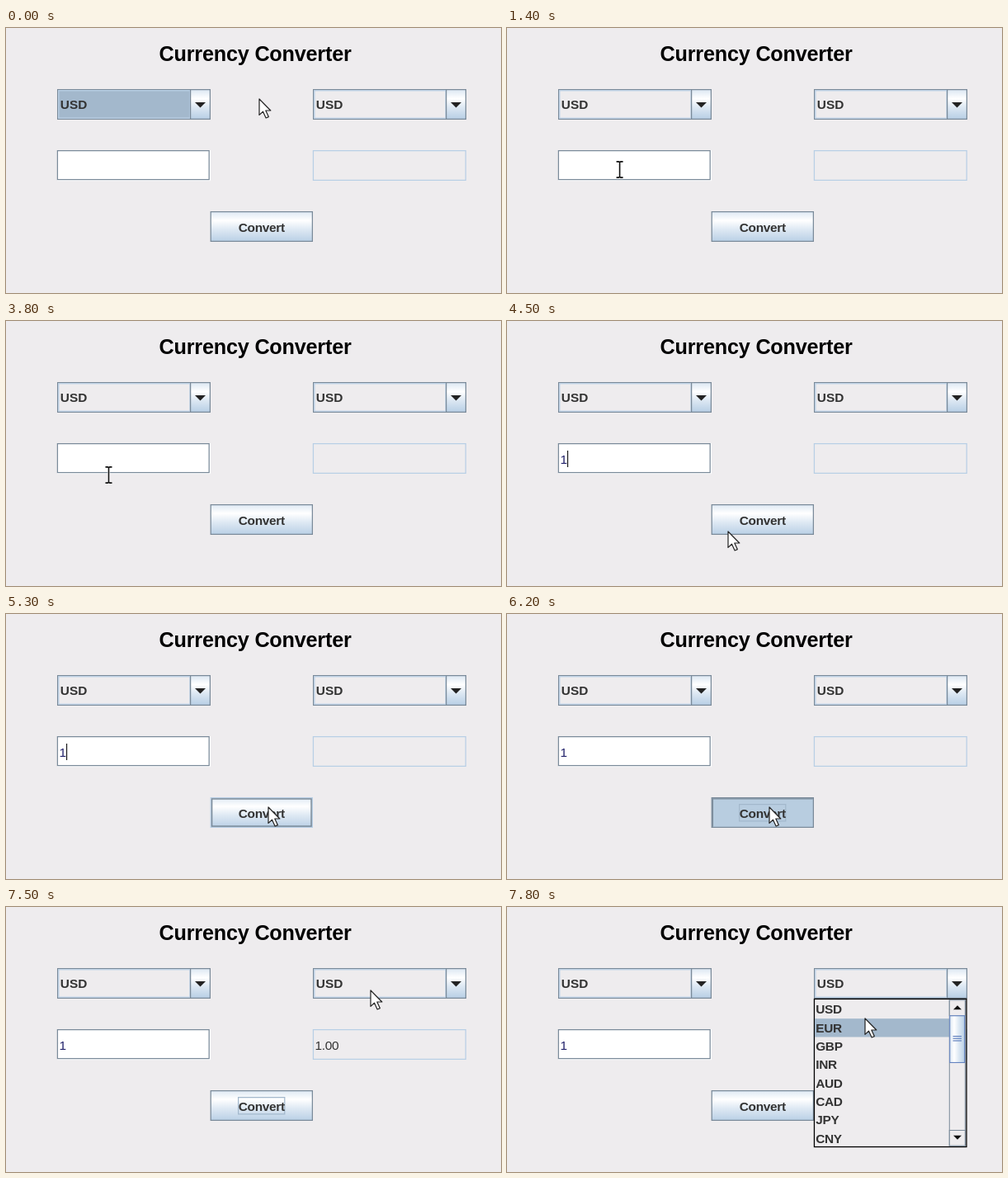
Recreate the animation shown at these times as an HTML page. Size 600x321 px, loop 8000 ms.

```html
<!DOCTYPE html>
<html lang="en">
<head>
<meta charset="utf-8">
<title>Currency Converter</title>
<style>
  html, body { margin: 0; width: 100%; height: 100%; overflow: hidden; background: #eeecee; }
  svg { display: block; width: 100vw; height: 100vh; }
  text { font: bold 15.4px "Liberation Sans", Arial, sans-serif; letter-spacing: -.3px; fill: #333; white-space: pre; }
  .title { font-size: 25.2px; letter-spacing: -.2px; fill: #000; }
  .value { font-weight: normal; }
</style>
</head>
<body>
<svg id="stage" viewBox="0 0 600 321" xmlns="http://www.w3.org/2000/svg">
  <defs>
    <linearGradient id="ocean" x1="0" y1="0" x2="0" y2="1">
      <stop offset="0" stop-color="#dde8f3"/>
      <stop offset=".3" stop-color="#fff"/>
      <stop offset=".6" stop-color="#dde8f3"/>
      <stop offset="1" stop-color="#b8cfe5"/>
    </linearGradient>
    <linearGradient id="oceanSide">
      <stop offset="0" stop-color="#dde8f3"/>
      <stop offset=".3" stop-color="#fff"/>
      <stop offset=".6" stop-color="#dde8f3"/>
      <stop offset="1" stop-color="#b8cfe5"/>
    </linearGradient>
  </defs>
</svg>
<script>
const stage = document.getElementById("stage");
const LOOP = 8000;
const EDGE = "#7a8a99", PALE = "#b8cfe5", PICK = "#a3b8cc", PRESS = "#b8cde0", PANEL = "#eeecee";

function add(tag, attrs, parent = stage) {
  const el = document.createElementNS("http://www.w3.org/2000/svg", tag);
  for (const key in attrs) el.setAttribute(key, attrs[key]);
  parent.appendChild(el);
  return el;
}
const group = parent => add("g", {}, parent);
const fillBox = (x, y, width, height, fill, parent) =>
  add("rect", { x, y, width, height, fill }, parent);
// The outline lies inside the given box.
const frameBox = (x, y, w, h, stroke, parent, line = 1.24, fill = "none") =>
  add("rect", { x: x + line / 2, y: y + line / 2, width: w - line, height: h - line,
    fill, stroke, "stroke-width": line }, parent);
const path = (d, attrs, parent) => add("path", { d, ...attrs }, parent);
function label(x, y, content, parent, cls = "") {
  const el = add("text", { x, y, class: cls }, parent);
  el.textContent = content;
  return el;
}
const show = (el, on) => el.setAttribute("visibility", on ? "visible" : "hidden");

function combo(x) {
  const y = 74;
  frameBox(x, y, 186, 37, EDGE, stage, 1.24, PANEL);
  const focus = fillBox(x + 1.3, y + 1.3, 160, 34.4, PICK);
  frameBox(x + 1.2, y + 1.2, 160.4, 34.6, PALE);
  fillBox(x + 161, y + 1, 24, 35, "url(#ocean)");
  frameBox(x + 161, y, 25, 37, EDGE);
  path(`M${x + 167} ${y + 16}h13l-6.5 6.6z`, { fill: "#222" });
  label(x + 3.8, y + 23.6, "USD").style.letterSpacing = "0";
  return focus;
}

label(185.6, 39.6, "Currency Converter", stage, "title");
const leftFocus = combo(62);
const rightFocus = combo(372);
show(rightFocus, false);

// Input and result fields
fillBox(62, 148, 186, 37.2, "#fff");
frameBox(61.8, 148, 185, 36.2, EDGE);
const amount = label(64.4, 172.6, "1", stage, "value");
amount.style.fill = "#22226a";
const caret = fillBox(64.4, 157, 1.3, 20, "#222");
frameBox(371.8, 148, 186, 37, PALE);
const result = label(374.4, 172.6, "1.00", stage, "value");

// Convert button
const face = fillBox(248, 222, 124, 37, "url(#ocean)");
const edge = frameBox(247.6, 222, 124.4, 37, EDGE);
const hover = group();
frameBox(247.6, 222, 124.4, 37, PALE, hover);
frameBox(248.8, 223.2, 122, 34.6, EDGE, hover, 1.5);
const sunken = path("M249.4 257.8V223.8H370.8", { fill: "none", stroke: EDGE, "stroke-width": 1.24 });
const focusRing = frameBox(281, 230, 57.4, 21.5, PICK);
label(281.8, 246.8, "Convert");

// Drop-down list
const popup = group();
frameBox(371.8, 110.8, 185.8, 180.4, "#000", popup, 1.3, PANEL);
const pick = fillBox(373, 113, 163, 22.3, PICK, popup);
"USD EUR GBP INR AUD CAD JPY CNY".split(" ").forEach((code, i) =>
  label(374.2, 129.4 + i * 22.3, code, popup));
frameBox(535.8, 112.3, 20, 177.4, EDGE, popup, 1);
for (const [y, tip] of [[112.3, "M541 124.2h10l-5-5z"], [270, "M541 276.8h10l-5 5z"]]) {
  fillBox(536.5, y, 18.6, 19.5, PANEL, popup);
  frameBox(535.8, y, 20, 19.7, EDGE, popup, 1);
  path(tip, { fill: "#111" }, popup);
}
fillBox(536.5, 131.5, 18.6, 57, "url(#oceanSide)", popup);
frameBox(536.2, 131.2, 19, 57.8, "#6382bf", popup, 1.1);
for (let i = 0; i < 3; i++) fillBox(540.5, 156 + i * 2.7, 10.5, 1.2, "#6382bf", popup);

// Pointers
const arrow = group();
path("M0 0V19.4L4.5 15.2L8.1 23L11.3 21.6L7.8 14H13.8Z",
  { fill: "#fff", stroke: "#222", "stroke-width": 1.2, "stroke-linejoin": "round" }, arrow);
const beam = group();
const beamShape = "M-4 -9.6H-1.2L0 -8.8L1.2 -9.6H4M0 -9V9M-4 9.6H-1.2L0 8.8L1.2 9.6H4";
path(beamShape, { fill: "none", stroke: "#fff", "stroke-width": 3.4, opacity: .65 }, beam);
path(beamShape, { fill: "none", stroke: "#111", "stroke-width": 1.6 }, beam);

// Pointer stops: start time, x, y, shape
const stops = [
  [0, 307, 86, arrow], [1400, 136.6, 171.5, beam], [3800, 124.5, 186.5, beam],
  [4500, 268, 255, arrow], [4900, 318, 234, arrow], [6400, 352, 200, arrow],
  [6500, 404, 146, arrow], [6600, 442, 101, arrow], [7700, 438, 118, arrow],
  [7800, 434, 135, arrow]
];
const within = (t, ...spans) => spans.some(([from, to]) => t >= from && t < to);

function draw(t) {
  const [, x, y, shape] = stops.filter(s => s[0] <= t).pop();
  for (const p of [arrow, beam]) show(p, p === shape);
  shape.setAttribute("transform", `translate(${x} ${y})`);

  const typed = t >= 4300;
  show(leftFocus, t < 1400);
  show(amount, typed);
  show(caret, within(t, [2300, 3300], [4300, 4800], [5300, 5800]));
  caret.setAttribute("x", typed ? 72.9 : 64.4);

  const pressed = within(t, [6100, 6300]);
  const over = within(t, [4900, 6100], [6300, 6400]);
  face.setAttribute("fill", pressed ? PRESS : "url(#ocean)");
  show(sunken, pressed);
  show(edge, !over);
  show(hover, over);
  show(focusRing, within(t, [6100, 7600]));
  show(result, t >= 6300);

  show(popup, t >= 7600);
  pick.setAttribute("y", t >= 7800 ? 135.2 : 113);
}

const start = performance.now();
function tick() {
  draw((performance.now() - start) % LOOP);
  requestAnimationFrame(tick);
}
tick();
</script>
</body>
</html>
```
